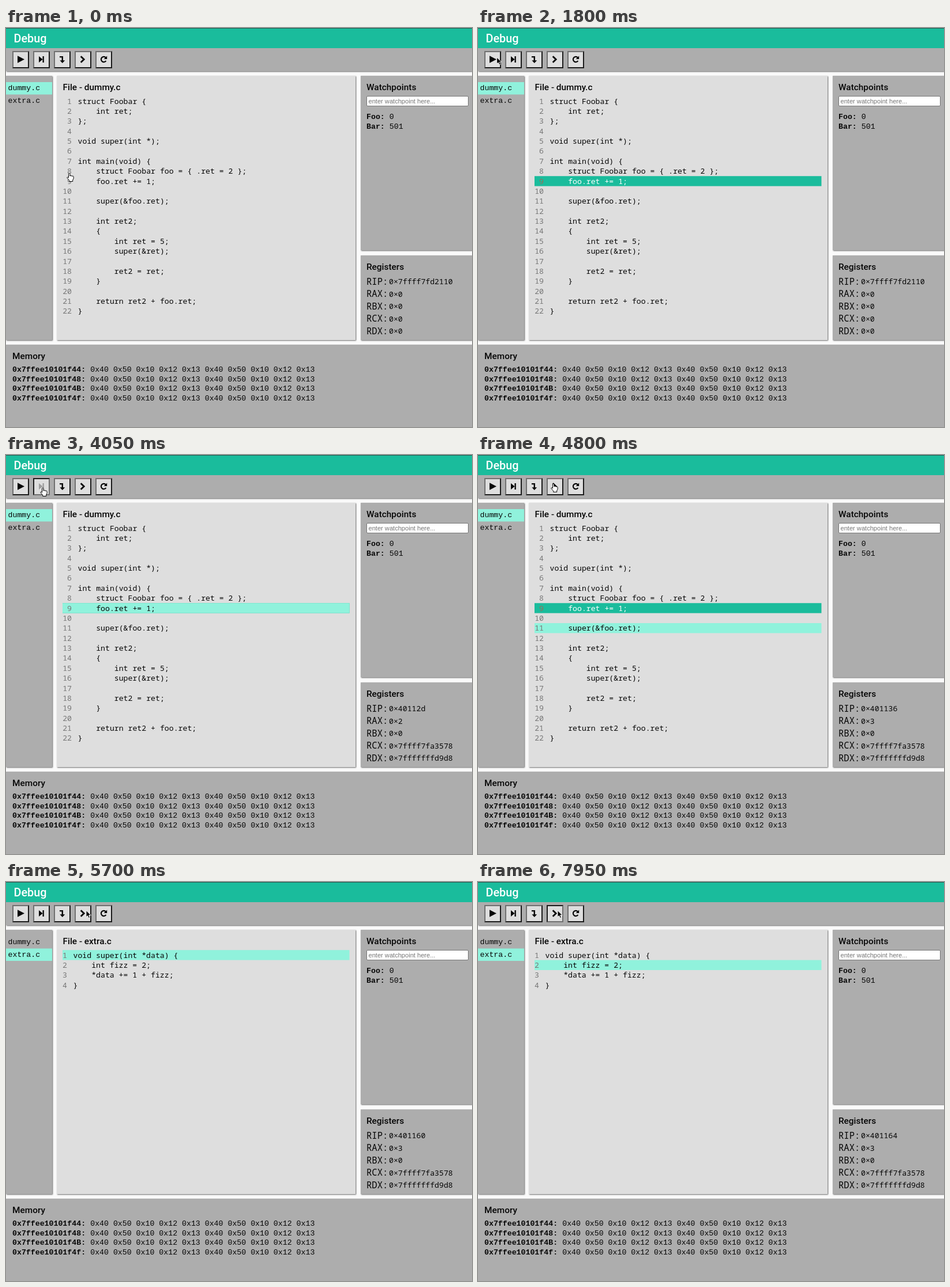
Animation of 808 by 693 pixels, one loop 8000 ms. Source, as an HTML page:

```html
<!DOCTYPE html>
<html lang="en">
<head>
<meta charset="utf-8">
<title>Debug</title>
<style>
html, body { margin: 0; width: 100%; height: 100%; overflow: hidden; background: #fafafa; }
#stage { position: absolute; inset: 0; overflow: clip; contain: strict; }
.panel, .bar, .key, .field { position: absolute; box-sizing: border-box; }
.panel { background: #adadad; box-shadow: 1px 1px 2px rgba(0, 0, 0, .6); }
.bar { left: 0; width: 100%; }
.key {
  top: 40px; width: 29px; height: 30px; background: #dedede;
  border: 2px solid; border-color: #707070 #1c1c1c #1c1c1c #707070;
}
.key.down { border-color: #1c1c1c #707070 #707070 #1c1c1c; }
.field { left: 625px; top: 118px; width: 177px; height: 18px; background: #fff; border: 1px solid #767676; border-radius: 2px; }
svg { position: absolute; left: 0; top: 0; width: 100%; height: 100%; overflow: hidden; }
text { white-space: pre; fill: #060606; }
.head { font: 500 15.4px Roboto, sans-serif; }
.code { font: 500 13.2px "Noto Sans Mono", monospace; }
.label { font: 500 15.6px "Noto Sans Mono", monospace; }
.type { font: 13.24px "Liberation Mono", monospace; }
.hint { font: 11.1px "Liberation Sans", sans-serif; fill: #757575; }
.bold { font-weight: 700; }
.num { fill: #777; text-anchor: end; font-weight: 400; }
.icon { fill: #060606; stroke: #060606; stroke-width: 0; }
.icon.off { opacity: .3; }
</style>
</head>
<body>
<div id="stage">
  <div id="panels"></div>
  <svg viewBox="0 0 808 693">
    <g id="marks"></g>
    <g id="still"></g>
    <g id="live"></g>
    <g id="icons">
      <path class="icon" d="M20 48.3 32 54.5 20 60.7z"/>
      <path class="icon" d="M57 49 63.5 54.5 57 60zM63.5 49h2.3v11h-2.3z"/>
      <path class="icon" d="M93 49h6v7.2h3.2L97.8 61l-4.4-4.8h3.2V51.3H93z"/>
      <g class="icon"><path d="M129.7 49.2 135.2 54.5 129.7 59.8" fill="none" stroke-width="2.8"/></g>
      <g class="icon"><path d="M173 51.4A4.6 4.6 0 1 0 173.4 57" fill="none" stroke-width="2.2"/><path d="M175.2 48.6v5.4h-5.4z"/></g>
    </g>
    <g id="cursor">
      <path id="arrow" d="M0 0V11.4L2.6 9 4.4 13 6.5 12.1 4.7 8.2H8.3z" fill="#000" stroke="#fff" stroke-width=".9"/>
      <path id="hand" d="M3.2 8.6V1.8a1.2 1.2 0 0 1 2.4 0V5.6a1.1 1.1 0 0 1 2.2.2 1.1 1.1 0 0 1 2.1.5 1 1 0 0 1 1.9.6V10L10.4 12.6V15H4.4V13L.9 9.2C0 7.8 1.6 6.9 2.4 7.8z" fill="#fff" stroke="#000"/>
    </g>
  </svg>
</div>
<script>
const LOOP = 8000, PITCH = 17.38, TEAL = '#1abc9c', MINT = '#90f2dc';
const $ = id => document.getElementById(id);

const files = {
  'dummy.c': `struct Foobar {
    int ret;
};

void super(int *);

int main(void) {
    struct Foobar foo = { .ret = 2 };
    foo.ret += 1;

    super(&foo.ret);

    int ret2;
    {
        int ret = 5;
        super(&ret);

        ret2 = ret;
    }

    return ret2 + foo.ret;
}`,
  'extra.c': `void super(int *data) {
    int fizz = 2;
    *data += 1 + fizz;
}`
};

const escapeText = s => s.replace(/&/g, '&amp;').replace(/</g, '&lt;');
const text = (x, y, cls, s, style = '') =>
  `<text x="${x}" y="${y}" class="${cls}" style="${style}">${escapeText(s)}</text>`;
const rect = (x, y, w, h, fill) =>
  `<rect x="${x}" y="${y}" width="${w}" height="${h}" fill="${fill}"/>`;
const box = (cls, x, y, w, h, extra = '') =>
  `<div class="${cls}" style="left:${x}px;top:${y}px;width:${w}px;height:${h}px;${extra}"></div>`;

$('panels').innerHTML =
  box('panel', 0, 35, 808, 40) +
  `<div class="bar" style="top:0;height:35px;background:${TEAL};border-top:1px solid #28564d"></div>` +
  box('panel', 0, 83, 80, 459) +
  box('panel', 88, 83, 518, 459, 'background:#dedede') +
  box('panel', 615, 83, 193, 303) +
  box('panel', 615, 395, 193, 147) +
  box('panel', 0, 550, 808, 143) +
  '<div class="field"></div>' +
  [0, 1, 2, 3, 4].map(i => `<div class="key" style="left:${11 + 36 * i}px"></div>`).join('');

const bytes = Array(2).fill('0x40 0x50 0x10 0x12 0x13').join(' ');
$('still').innerHTML =
  text(13.5, 25, 'head', 'Debug', 'font-size:19.8px;fill:#fff') +
  text(625, 108, 'head', 'Watchpoints') +
  text(625, 419.5, 'head', 'Registers') +
  text(11, 575, 'head', 'Memory') +
  text(628.5, 131, 'hint', 'enter watchpoint here...') +
  text(3.5, 108, 'type', 'dummy.c') + text(3.5, 130, 'type', 'extra.c') +
  [['Foo:', '0'], ['Bar:', '501']].map(([name, value], i) =>
    text(625, 158 + 16.5 * i, 'type bold', name) + text(664.8, 158 + 16.5 * i, 'type', value)).join('') +
  ['RIP:', 'RAX:', 'RBX:', 'RCX:', 'RDX:'].map((s, i) => text(625, 445.8 + 21.5 * i, 'label', s)).join('') +
  ['44', '48', '4B', '4f'].map((end, i) =>
    text(11, 597 + 16.5 * i, 'type bold', `0x7ffee10101f${end}:`) +
    text(146.2, 597 + 16.5 * i, 'type', bytes)).join('');

const hand = (x, y) => ({ shape: 'hand', x, y });
const arrow = (x, y) => ({ shape: 'arrow', x, y });

// Each entry overrides part of the state from its time on.
const events = [
  [0, { file: 'dummy.c', line: 0, stop: 0, down: -1, off: -1,
        regs: ['7ffff7fd2110', '0', '0', '0', '0'], ...hand(105.3, 251.5) }],
  [150, hand(107.6, 254.3)],
  [450, hand(107.8, 257)],
  [600, hand(107.8, 260)],
  [900, { stop: 9 }],
  [1200, arrow(106, 238)],
  [1350, arrow(88, 150)],
  [1500, arrow(56, 72)],
  [1650, arrow(38, 44)],
  [1800, arrow(32.6, 51)],
  [2250, { line: 9, regs: ['40112d', '2', '0', '7ffff7fa3578', '7fffffffd9d8'] }],
  [2400, arrow(36, 51)],
  [2550, arrow(58, 53)],
  [2700, arrow(90, 56)],
  [2850, arrow(112.3, 56.5)],
  [3000, arrow(121, 54)],
  [3150, arrow(124, 53)],
  [3300, arrow(112, 53)],
  [3450, arrow(86, 55)],
  [3600, hand(65, 56)],
  [3750, hand(59.3, 56.5)],
  [4050, { down: 1, off: 1 }],
  [4200, { down: -1, off: -1, line: 11, regs: ['401136', '3', '0', '7ffff7fa3578', '7fffffffd9d8'] }],
  [4800, hand(126.3, 49.3)],
  [4950, { down: 3 }],
  [5100, { down: -1, rip: '40113a' }],
  [5250, hand(128, 49.3)],
  [5400, { down: 3 }],
  [5550, { down: -1, file: 'extra.c', line: 1, stop: 0, rip: '401160' }],
  [5700, arrow(139, 49.5)],
  [6300, { off: 3, ...arrow(138, 49.5) }],
  [6450, { off: -1, line: 2, rip: '401161' }],
  [7200, { down: 3 }],
  [7350, { down: -1, rip: '401164' }],
  [7950, { down: 3 }]
];

const keys = document.querySelectorAll('.key'), icons = $('icons').children;
let shown = -1;

function render(count) {
  const s = Object.assign({}, ...events.slice(0, count).map(e => e[1]));
  const lines = files[s.file].split('\n');
  const numEnd = lines.length > 9 ? 114 : 106;
  const top = n => 118.4 + PITCH * (n - 1);
  const mark = (n, fill) => n ? rect(98, top(n) - .2, 497.5, PITCH, fill) : '';

  $('marks').innerHTML =
    rect(0, s.file === 'dummy.c' ? 94 : 115.5, 80, 21.5, MINT) +
    mark(s.stop, TEAL) + mark(s.line, MINT);

  $('live').innerHTML = text(98.5, 108, 'head', 'File - ' + s.file) +
    lines.map((line, i) => {
      const n = i + 1, y = top(n) + 13.1, stopped = n === s.stop && n !== s.line;
      return text(numEnd, y, 'code num', String(n), stopped ? 'fill:#92705f' : '') +
        text(numEnd + 10.5, y, 'code', line, stopped ? 'fill:#fff' : '');
    }).join('') +
    s.regs.map((value, i) =>
      text(664, 445 + 21.5 * i, 'code', '0×' + (i === 0 && s.rip || value))).join('');

  keys.forEach((key, i) => {
    key.classList.toggle('down', i === s.down);
    icons[i].classList.toggle('off', i === s.off);
  });
  for (const shape of ['arrow', 'hand']) $(shape).style.display = s.shape === shape ? '' : 'none';
  $('cursor').setAttribute('transform', `translate(${s.x} ${s.y})`);
}

const start = performance.now();
function tick() {
  const t = (performance.now() - start) % LOOP;
  const count = events.filter(e => e[0] <= t).length;
  if (count !== shown) render(shown = count);
  requestAnimationFrame(tick);
}
tick();
</script>
</body>
</html>
```
